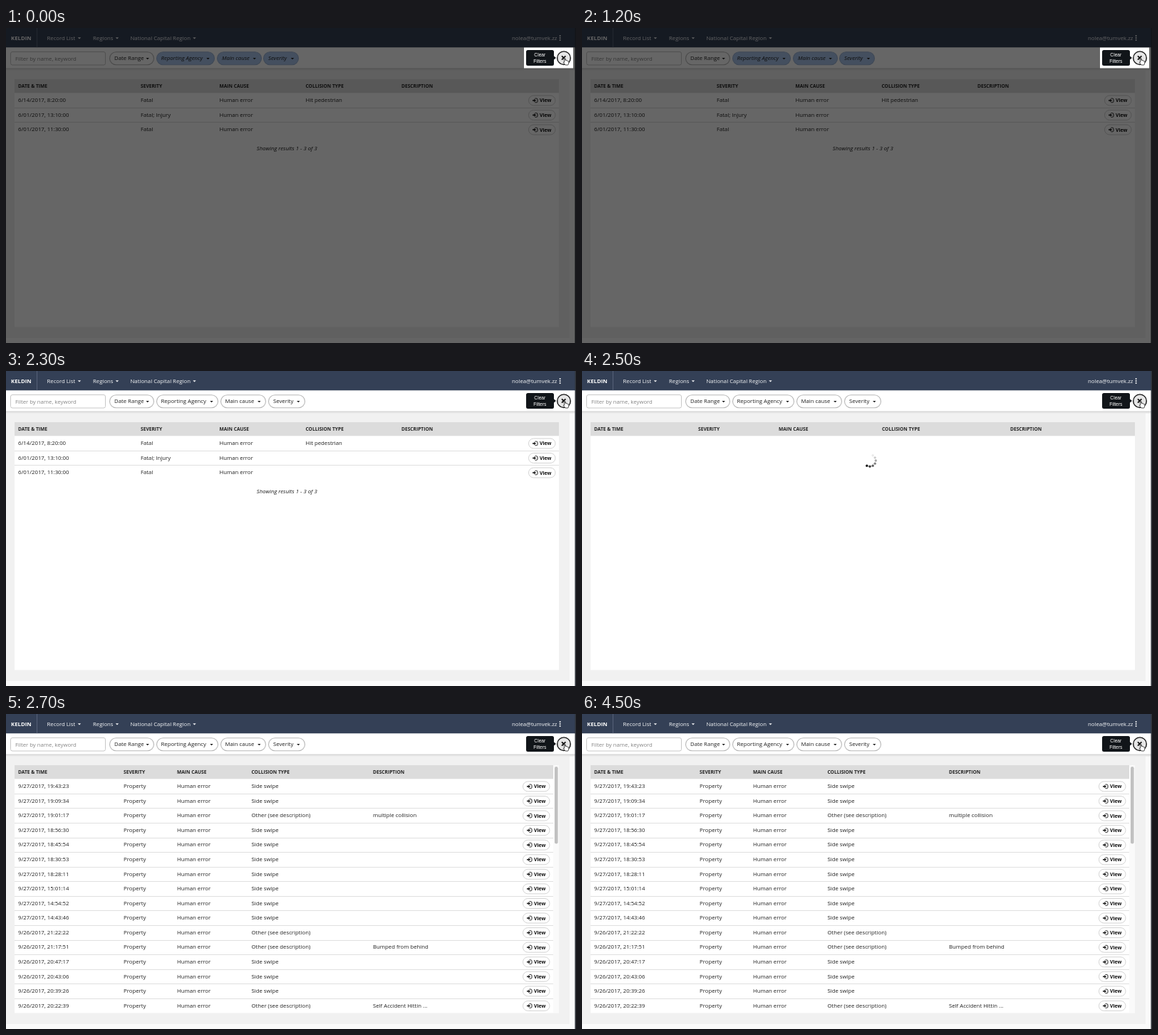
Recreate the animation shown at these times as an HTML page with a canvas. Size 800 px wide and 443 px high, loop 5700 ms.

```html
<!DOCTYPE html>
<html lang="en">
<head>
<meta charset="utf-8">
<title>Clearing record filters</title>
<style>
html, body { margin: 0; width: 100%; height: 100%; overflow: hidden; background: #fff; }
canvas { display: block; width: 800px; height: 443px; }
</style>
</head>
<body>
<canvas id="stage" width="800" height="443"></canvas>
<script>
const ctx = document.getElementById('stage').getContext('2d');
const LOOP = 5700;
const SANS = '"Open Sans", sans-serif';
const BODY = `7.78px ${SANS}`;
const ITALIC = `italic ${BODY}`;
const HEAD = `bold 6.67px ${SANS}`;
const ROW = 20.57;
const HEADINGS = ['DATE & TIME', 'SEVERITY', 'MAIN CAUSE', 'COLLISION TYPE', 'DESCRIPTION'];

const OTHER = 'Other (see description)';
const filteredRows = [
  ['6/14/2017, 8:20:00', 'Fatal', 'Human error', 'Hit pedestrian'],
  ['6/01/2017, 13:10:00', 'Fatal; Injury', 'Human error'],
  ['6/01/2017, 11:30:00', 'Fatal', 'Human error']
];
const notes = { 2: 'multiple collision', 10: '', 11: 'Bumped from behind', 15: 'Self Accident Hittin ...' };
const times = ['19:43:23', '19:09:34', '19:01:17', '18:56:30', '18:45:54', '18:30:53', '18:28:11', '15:01:14',
  '14:54:52', '14:43:46', '21:22:22', '21:17:51', '20:47:17', '20:43:06', '20:39:26', '20:22:39'];
const allRows = times.map((time, i) => [
  `9/${i < 10 ? 27 : 26}/2017, ${time}`, 'Property', 'Human error',
  i in notes ? OTHER : 'Side swipe', notes[i] || ''
]);

function box(x, y, w, h, color) {
  ctx.fillStyle = color;
  ctx.fillRect(x, y, w, h);
}

function text(str, x, y, font = BODY, color = '#222', align = 'left') {
  ctx.font = font;
  ctx.fillStyle = color;
  ctx.textAlign = align;
  ctx.fillText(str, x, y);
}

function rounded(x, y, w, h, r, fill, stroke, width = 1) {
  ctx.beginPath();
  ctx.roundRect(x, y, w, h, r);
  ctx.fillStyle = fill;
  ctx.fill();
  if (!stroke) return;
  ctx.strokeStyle = stroke;
  ctx.lineWidth = width;
  ctx.stroke();
}

function polygon(points, fill) {
  ctx.beginPath();
  points.forEach(([x, y]) => ctx.lineTo(x, y));
  ctx.closePath();
  ctx.fillStyle = fill;
  ctx.fill();
}

function dot(x, y, r, color) {
  ctx.beginPath();
  ctx.arc(x, y, r, 0, Math.PI * 2);
  ctx.fillStyle = color;
  ctx.fill();
}

function caret(x, y, color = '#222') {
  polygon([[x - 2.2, y - 1], [x + 2.2, y - 1], [x, y + 1.3]], color);
}

function navBar() {
  box(0, 0, 800, 27.5, '#344056');
  box(43, 0, 1, 27.5, '#566178');
  text('KELDIN', 7, 16.5, `bold ${BODY}`, '#fff');
  [['Record List', 57.5, 103], ['Regions', 122, 156], ['National Capital Region', 174.5, 264.5]]
    .forEach(([label, x, mark]) => {
      text(label, x, 16.5, BODY, '#f4f5f7');
      caret(mark, 14.2, '#f4f5f7');
    });
  text('nolea@tumvek.zz', 710, 16.5, BODY, '#f4f5f7');
  [11, 14, 17].forEach(y => dot(777.6, y, 1, '#fff'));
}

function pill(label, x, w, textX, caretX, active) {
  rounded(x + .5, 33.8, w - 1, 18, 9, active ? '#abc6ee' : '#fff', active ? '#9db5d8' : '#b9b9b9', 1.1);
  text(label, textX, 45.4, active ? ITALIC : BODY);
  caret(caretX, 43);
}

function toolbar(active) {
  box(0, 27.5, 800, 29, '#fff');
  box(0, 56.5, 800, 1.5, '#d9d9d9');
  box(0, 58, 800, 1.5, '#e7e7e7');
  rounded(6.5, 33.5, 133, 18.5, 2.5, '#fff', '#c8c8c8');
  text('Filter by name, keyword', 13, 45.8, BODY, '#858585');
  pill('Date Range', 145, 63, 152, 198.7);
  const pills = active
    ? [['Reporting Agency', 211, 82, 217.5, 283.5], ['Main cause', 296, 63, 303, 348.7], ['Severity', 361, 50, 368, 402]]
    : [['Reporting Agency', 211, 87, 217.5, 288.5], ['Main cause', 301, 64, 307.5, 355.3], ['Severity', 368, 52, 375, 410.3]];
  pills.forEach(p => pill(...p, active));
}

function clearButton() {
  rounded(730, 31, 39, 22, 2.5, '#111519');
  polygon([[769, 39.5], [772, 42], [769, 44.5]], '#111519');
  const font = '6.67px "Liberation Sans", Arial, sans-serif';
  text('Clear', 749.3, 39.6, font, '#fff', 'center');
  text('Filters', 749.3, 48.6, font, '#fff', 'center');

  dot(783, 42.2, 9.3, '#e6e6e6');
  ctx.strokeStyle = '#111';
  ctx.lineWidth = 1.4;
  ctx.stroke();
  ctx.lineWidth = 1.8;
  ctx.beginPath();
  ctx.moveTo(780, 39.3); ctx.lineTo(785.4, 44.7);
  ctx.moveTo(785.4, 39.3); ctx.lineTo(780, 44.7);
  ctx.stroke();
  pointer(782, 42);
}

function pointer(x, y) {
  ctx.save();
  ctx.translate(x, y);
  const hand = new Path2D('M1 .8Q2 0 2.6 1.2L3.2 3.7 4.2 3.4 5 4 6 3.9 6.6 4.6Q8 4.3 8 5.8L7.6 8.2 6.8 10H3L.4 6.7Q0 5.4 1.8 6.1Z');
  ctx.fillStyle = '#fff';
  ctx.fill(hand);
  ctx.strokeStyle = '#222';
  ctx.lineWidth = .8;
  ctx.stroke(hand);
  ctx.restore();
}

function viewButton(x, y) {
  rounded(x + .5, y - 7, 37.5, 14, 7, '#fff', '#cfcfcf', .9);
  ctx.strokeStyle = '#222';
  ctx.lineWidth = 1;
  ctx.beginPath();
  ctx.moveTo(x + 9.5, y - 2.8);
  ctx.lineTo(x + 11.5, y - 2.8);
  ctx.quadraticCurveTo(x + 13, y - 2.8, x + 13, y - 1.4);
  ctx.lineTo(x + 13, y + 1.4);
  ctx.quadraticCurveTo(x + 13, y + 2.8, x + 11.5, y + 2.8);
  ctx.lineTo(x + 9.5, y + 2.8);
  ctx.stroke();
  box(x + 6, y - .8, 3, 1.6, '#222');
  polygon([[x + 8.2, y - 2.4], [x + 11, y], [x + 8.2, y + 2.4]], '#222');
  text('View', x + 16, y + 2.5, `bold 6.9px ${SANS}`, '#111');
}

function table(columns, rows, right) {
  box(12, 72, 764, 348.5, '#fff');
  box(12, 72, right - 12, 19.3, '#dcdcdc');
  HEADINGS.forEach((label, i) => text(label, columns[i], 83.8, HEAD));
  rows.forEach((row, r) => {
    const y = 101.6 + r * ROW;
    if (r) box(12, Math.round(y - ROW / 2), right - 12, 1, '#e0e0e0');
    row.forEach((value, i) => text(value, columns[i], y + 2.6));
    viewButton(right - 43, y + .3);
  });
}

function spinner(head) {
  [1, .85, .7, .55, .38, .22, .09].forEach((alpha, i) => {
    const a = (head - i * 30) * Math.PI / 180;
    dot(404 + 8.3 * Math.cos(a), 126 + 8.3 * Math.sin(a), 1.7, `rgba(25,25,25,${alpha})`);
  });
}

function dimPage() {
  ctx.beginPath();
  ctx.rect(0, 0, 800, 443);
  ctx.rect(727, 27.5, 69, 29);
  ctx.fillStyle = 'rgba(0,0,0,.6)';
  ctx.fill('evenodd');
}

function draw(t) {
  const dimmed = t < 2000;
  box(0, 0, 800, 443, '#f1f1f1');
  box(791, 59, 7, 384, '#fafafa');
  box(0, 436, 798, 7, '#fafafa');
  navBar();
  toolbar(dimmed);
  if (t < 2500) {
    table([17, 189, 299.5, 420.5, 555], filteredRows, 776);
    text('Showing results 1 - 3 of 3', 394.3, 172, ITALIC, '#222', 'center');
  } else if (t < 2700) {
    table([17, 163, 276, 421, 601], [], 776);
    spinner(t < 2600 ? 120 : 180);
  } else {
    table([17, 165, 240, 344.5, 515], allRows, 768);
    box(768, 72, 8, 348.5, '#fafafa');
    rounded(770, 74, 4.6, 108.5, 2.3, '#c1c1c1');
  }
  if (dimmed) box(727, 27.5, 69, 29, '#fff');
  clearButton();
  box(798.5, 0, 1.5, 443, '#30343b');
  if (dimmed) dimPage();
}

const start = performance.now();
function tick() {
  draw((performance.now() - start) % LOOP);
  requestAnimationFrame(tick);
}
tick();
</script>
</body>
</html>
```
